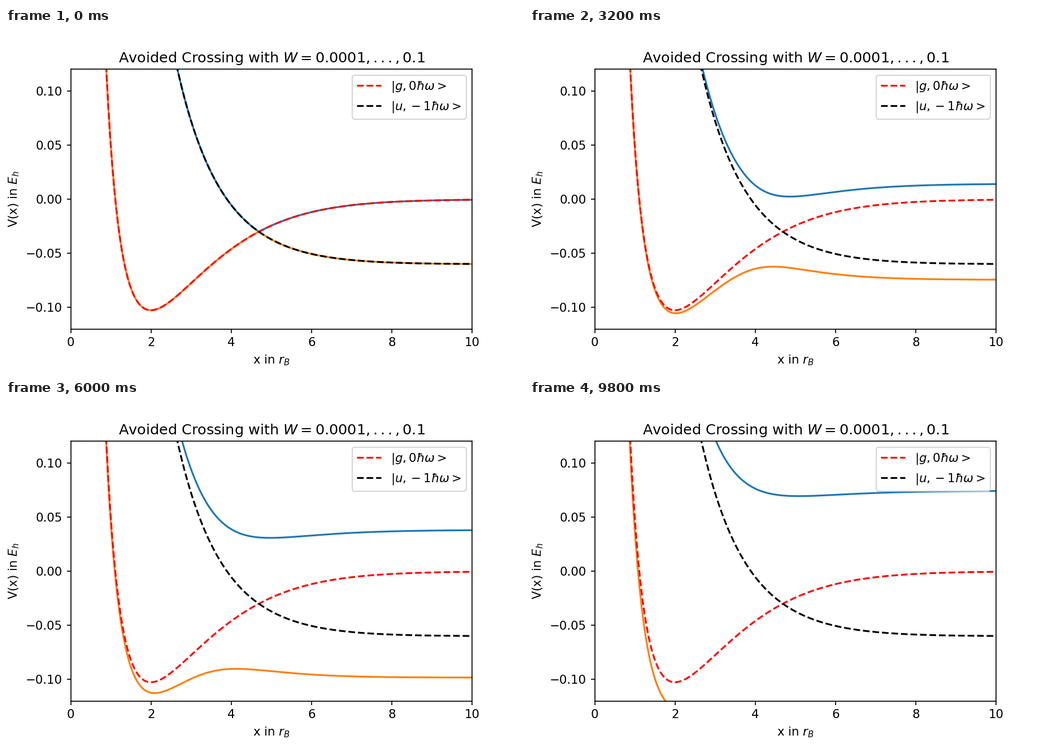
Write a matplotlib script that moves like this. It is 917x611 px and loops after 10 s.

```python
import numpy as np
from numpy.polynomial import laguerre as lag
import matplotlib.pyplot as plt
from matplotlib.animation import FuncAnimation

WIDTH, HEIGHT, DPI = 917, 611, 152.75
FRAMES, INTERVAL = 50, 200
PHOTON = 0.06
N_RADIAL, N_ANGULAR = 12, 24


def separation_constant(p, parity):
    """Angular eigenvalue of the two-centre problem in a Legendre basis."""
    l = np.arange(N_ANGULAR)
    k = l[1:]
    step = k / np.sqrt(4 * k**2 - 1)
    eta = np.diag(step, 1) + np.diag(step, -1)
    part = slice(parity, None, 2)
    eta2 = (eta @ eta)[part, part]
    rot = np.diag(l * (l + 1))[part, part]
    return np.linalg.eigvalsh(p[:, None, None]**2 * eta2 - rot)[:, -1]


def molecular_ion(x, parity):
    """Exact H2+ potential curve: even (0) or odd (1) lowest sigma state."""
    p = np.linspace(0.12, 6.3, 600)
    a = separation_constant(p, parity)

    t, w = lag.laggauss(N_RADIAL + 6)
    f = lag.lagvander(t, N_RADIAL - 1).T
    df = lag.lagval(t, lag.lagder(np.eye(N_RADIAL))) - f / 2

    def matrix(u, weight):
        return np.einsum("it,pt,jt->pij", u, weight * w, u, optimize=True)

    q = p[:, None]
    xi = 1 + t / (2 * q)
    stiff = matrix(df, t**2 + 4 * q * t)
    stiff += matrix(f, q**2 * xi**2 - a[:, None])
    mass = matrix(f, 2 * xi)

    # For a given p the distance r is the lowest radial eigenvalue.
    r = np.linalg.eigvals(np.linalg.solve(mass, stiff)).real.min(axis=1)
    energy = np.interp(x, r, -2 * p**2 / r**2)
    return energy + 1 / x + 0.5


x = np.linspace(0.5, 10, 500)
v_g = molecular_ion(x, 0)
v_u = molecular_ion(x, 1) - PHOTON
mean, half = (v_g + v_u) / 2, (v_g - v_u) / 2
couplings = np.linspace(0.0001, 0.1, FRAMES)

plt.rcParams.update({"font.family": "DejaVu Sans", "font.size": 10})
fig = plt.figure(figsize=((WIDTH + 1e-6) / DPI, HEIGHT / DPI), dpi=DPI)
fig.subplots_adjust(left=0.125, right=0.9, bottom=0.125, top=0.88)
ax = fig.add_subplot()

upper, = ax.plot(x, mean, color="C0")
lower, = ax.plot(x, mean, color="C1")
ax.plot(x, v_g, "r--", label=r"$|g, 0\hbar\omega>$")
ax.plot(x, v_u, "k--", label=r"$|u, -1\hbar\omega>$")

ax.set(xlim=(0, 10), ylim=(-0.12, 0.12),
       xlabel="x in $r_B$", ylabel="V(x) in $E_h$",
       title="Avoided Crossing with $W = 0.0001,...,0.1$")
ax.legend(loc="upper right")


def update(i):
    gap = np.hypot(half, couplings[i])
    upper.set_ydata(mean + gap)
    lower.set_ydata(mean - gap)
    return upper, lower


anim = FuncAnimation(fig, update, frames=FRAMES, interval=INTERVAL,
                     init_func=lambda: update(0), repeat=True, repeat_delay=0)
plt.show()
```
